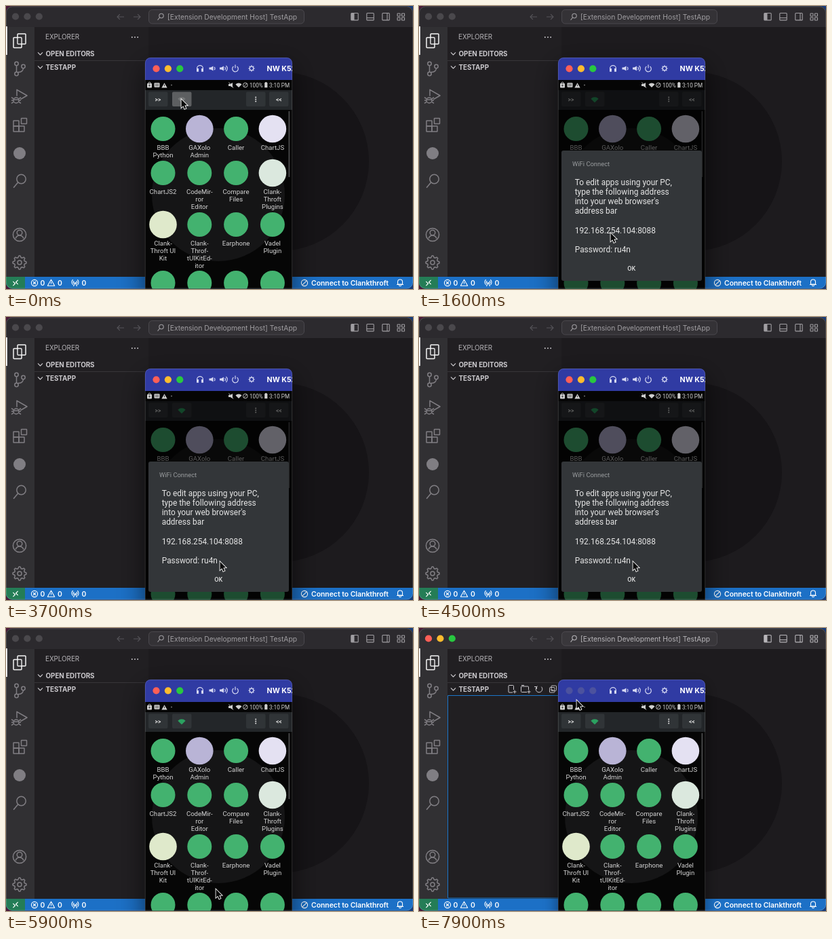
An HTML page with a canvas for the animation above (8000 ms loop, 600x417 px).

```html
<!DOCTYPE html>
<html lang="en">
<head>
<meta charset="utf-8">
<title>WiFi Connect</title>
<style>
html, body { margin: 0; width: 100%; height: 100%; overflow: hidden; background: #1c1b1e; }
canvas { display: block; width: 600px; height: 417px; }
</style>
</head>
<body>
<canvas id="stage"></canvas>
<script>
const W = 600, H = 417, LOOP = 8000, PI = Math.PI;
const canvas = document.getElementById('stage');
const dpr = window.devicePixelRatio || 1;
canvas.width = W * dpr;
canvas.height = H * dpr;
const c = canvas.getContext('2d');

const UI = 'Inter, "Open Sans", sans-serif';
const DROID = 'Roboto, "Noto Sans", sans-serif';
const LIGHTS = ['#fe5f57', '#febc2e', '#28c840'];
const ARROW = new Path2D('M.5.5v12.3l2.8-2.6 2 4.6 2.1-.9-2-4.5 3.8-.2z');

// pointer moves: start, duration, end x, end y
const moves = [
  [700, 750, 282, 334], [2900, 600, 315, 360], [4500, 600, 309, 384.5],
  [5900, 700, 159, 269], [7000, 800, 232, 106]
];
const apps = ('BBB Python,GAXolo Admin,Caller,ChartJS,ChartJS2,CodeMir- ror Editor,Compare Files,' +
  'Clank- Throft Plugins,Clank- Throft_UI Kit,Clank- Throf- tUIKitEd- itor,Earphone,Vadel Plugin,,,,').split(',');
const badges = { 1: '#b9b4d6', 3: '#e4e1f2', 7: '#dbe8de', 8: '#dfe9cb' };
const rows = [181, 246, 322, 408];
const message = ['To edit apps using your PC,', 'type the following address', "into your web browser's",
  'address bar', '', '192.168.254.104:8088', '', 'Password: ru4n'];

const clamp = v => Math.max(0, Math.min(1, v));
const ramp = (t, from, len) => clamp((t - from) / len);
const ease = v => v * v * (3 - 2 * v);

function pen(color, width = 1.1) {
  c.strokeStyle = c.fillStyle = color;
  c.lineWidth = width;
}
function rect(x, y, w, h, color) {
  c.fillStyle = color;
  c.fillRect(x, y, w, h);
}
function box(x, y, w, h, r, fill) {
  c.beginPath();
  c.roundRect(x, y, w, h, r);
  if (fill) { c.fillStyle = fill; c.fill(); } else c.stroke();
}
function dot(x, y, r, color) {
  c.beginPath();
  c.arc(x, y, r, 0, 2 * PI);
  c.fillStyle = color;
  c.fill();
}
function ring(x, y, r, mid = 0, half = PI) {
  c.beginPath();
  c.arc(x, y, r, mid - half, mid + half);
  c.stroke();
}
function line(x, y, dx, dy) {
  c.beginPath();
  c.moveTo(x, y);
  c.lineTo(x + dx, y + dy);
  c.stroke();
}
// V shape with its point facing the given angle
function chevron(x, y, s, angle) {
  c.beginPath();
  for (const k of [-1, 0, 1]) {
    const a = angle + k * PI * 0.75, r = k ? s : 0;
    c.lineTo(x + Math.cos(a) * r, y + Math.sin(a) * r);
  }
  c.stroke();
}
function triangle(x, y, r, angle, filled) {
  c.beginPath();
  for (let i = 0; i < 3; i++) {
    const a = angle + i * PI * 2 / 3;
    c.lineTo(x + Math.cos(a) * r, y + Math.sin(a) * r);
  }
  c.closePath();
  filled ? c.fill() : c.stroke();
}
function plus(x, y, s) {
  line(x - s, y, 2 * s, 0);
  line(x, y - s, 0, 2 * s);
}
function text(s, x, y, size, color, family = UI, weight = 400, align = 'left') {
  c.font = `${weight} ${size}px ${family}`;
  c.textAlign = align;
  c.fillStyle = color;
  c.fillText(s, x, y);
}
function lights(x, y, off) {
  LIGHTS.forEach((col, i) => dot(x + i * 17.4, y, 5.1, off || col));
}
function gear(x, y, r) {
  c.beginPath();
  for (let i = 0; i < 32; i++) {
    const a = (i - 0.5) * PI / 16, k = i % 4 < 2 ? r : r * 0.76;
    c.lineTo(x + Math.cos(a) * k, y + Math.sin(a) * k);
  }
  c.closePath();
  c.stroke();
  ring(x, y, r * 0.3);
}
function lens(x, y, r, side) {
  ring(x, y, r);
  line(x + side * r * 0.7, y + r * 0.7, side * r, r * 1.2);
}
function wifi(x, y, r, color) {
  c.beginPath();
  c.moveTo(x, y);
  c.arc(x, y, r, -PI * 0.75, -PI * 0.25);
  c.fillStyle = color;
  c.fill();
}
function speaker(x, y, waves) {
  triangle(x, y, 4, PI, true);
  c.fillRect(x - 4, y - 1.5, 3, 3);
  for (let i = 0; i < waves; i++) ring(x + 1.5, y, 3 + i * 2.7, 0, 0.8);
}
function banned(x, y, r) {
  ring(x, y, r);
  line(x - r * 0.7, y + r * 0.7, r * 1.4, -r * 1.4);
}

function activityBar() {
  rect(0, 31, 42, 368, '#313033');
  rect(0, 30, 1.8, 42, '#fff');
  c.lineJoin = 'round';
  pen('#f4f4f4', 1.5);
  box(17, 41, 12, 15, 1);
  box(11, 46.5, 12, 15, 1);
  rect(17.8, 47.5, 4.4, 7.7, '#313033');
  pen('#807e83', 1.5);
  // branches
  for (const y of [85, 100]) ring(15.5, y, 2.7);
  ring(25.5, 89, 2.7);
  line(15.5, 88, 0, 9);
  ring(19.5, 91.5, 6, PI * 0.3, 0.9);
  // run and debug
  triangle(21, 132, 10, 0);
  dot(15, 139, 6.5, '#313033');
  ring(15, 139, 4);
  line(11, 138, 8, 0);
  for (const k of [-4, 0, 4]) {
    line(11, 139 + k * 0.6, -3, k * 0.5);
    line(19, 139 + k * 0.6, 3, k * 0.5);
  }
  // extensions
  for (const [x, y] of [[11, 169], [11, 177], [19, 177]]) box(x, y, 8, 8, 0.5);
  box(22.5, 165.5, 8, 8, 0.5);
  dot(20, 217, 9, '#807e83');
  lens(22.5, 255, 6.7, -1);
  // account
  ring(20, 337, 9.6);
  ring(20, 334, 3.8);
  ring(20, 344, 6, -PI / 2, 1.35);
  gear(20, 378, 10);
}

function titleBar(active) {
  rect(0, 0, W, 31, active ? '#312f33' : '#2c2a2e');
  lights(14, 15.5, !active && '#4a484c');
  pen('#57555a');
  for (const [x, dir] of [[169, -1], [193, 1]]) {
    line(x - 5, 16, 10, 0);
    chevron(x + dir * 5, 16, 5.5, dir < 0 ? PI : 0);
  }
  const ink = active ? '#b8b6ba' : '#a09ea2';
  box(210.5, 5.5, 229, 20.5, 5, active ? '#39373b' : '#343236');
  pen('#525055', 0.8);
  box(210.5, 5.5, 229, 20.5, 5);
  pen(ink);
  lens(229, 14.5, 3.2, -1);
  text('[Extension Development Host] TestApp', 238, 19.5, 10.3, ink);
  // layout toggles
  for (const x of [514, 537, 560]) box(x - 5.2, 10.5, 10.4, 10.4, 1);
  c.fillRect(509, 10.5, 4.5, 10.4);
  line(532, 17.5, 10, 0);
  line(562, 10.5, 0, 10.4);
  for (const y of [11, 17]) {
    box(577, y, 4, 4, 0.5);
    box(583.5, y, 4, 4, 0.5);
  }
}

function explorer(focused) {
  const ink = '#cbc9cd';
  rect(42, 31, 168, 368, '#211f22');
  rect(42, 80, 164, 0.8, '#3d3b3f');
  text('EXPLORER', 58, 49.3, 9.8, '#b6b4b8');
  for (let i = 0; i < 3; i++) dot(185.8 + i * 4.2, 46, 0.95, ink);
  pen(ink);
  ['OPEN EDITORS', 'TESTAPP'].forEach((s, i) => {
    chevron(50.5, 72 + i * 20, 5, PI / 2);
    text(s, 58.5, 73.5 + i * 20, 9.8, ink, UI, 700);
  });
  if (!focused) return;
  pen(ink, 1);
  // new file, new folder, refresh, collapse
  box(132, 84.5, 7.5, 10.5, 1);
  box(150.5, 86, 11, 8.5, 1);
  line(151, 84.5, 4, 0);
  for (const x of [140, 161]) {
    rect(x - 2, 91, 6, 6, '#211f22');
    pen(ink, 1);
    plus(x + 1, 94, 2.5);
  }
  ring(177, 90, 4.8, PI * 0.55, 2.5);
  chevron(173.5, 86.5, 3.5, -PI / 4);
  box(195, 85, 7.5, 7.5, 1);
  box(192.5, 87.5, 7.5, 7.5, 1);
  line(194.2, 91.2, 4, 0);
  pen('#1b76c9', 1);
  c.strokeRect(42.5, 99.5, 168, 298.5);
}

function statusBar() {
  rect(0, 399, W, 18, '#1c70c6');
  rect(0, 399, 28, 18, '#247d56');
  pen('#fff');
  chevron(13.5, 409, 4.5, 0);
  chevron(14.5, 407, 4.5, PI);
  ring(42, 408, 4.6);
  for (const k of [-2, 2]) line(40, 408 - k, 4, 2 * k);
  triangle(66.5, 409.2, 6, -PI / 2);
  line(66.5, 406.5, 0, 3);
  for (const r of [2.6, 5]) for (const a of [0, PI]) ring(102, 407, r, a, 0.85);
  for (const k of [-2.5, 2.5]) line(102, 407, k, 6);
  for (const x of [50.5, 76, 111.5]) text('0', x, 411.8, 10.4, '#fff', UI, 600);
  banned(440, 408, 4.6);
  text('Connect to Clankthroft', 450, 411.8, 10.4, '#fff', UI, 600);
  // bell
  box(577.5, 403, 7, 7, [3.5, 3.5, 0, 0]);
  line(576, 410.5, 10, 0);
  ring(581, 411.2, 1.6, PI / 2, PI / 2);
}

function phoneTitle(active) {
  rect(205, 76, 217, 33, '#303ba3');
  lights(221.5, 92.3, !active && '#4c529e');
  pen('#d5d8f3', 1.2);
  ring(286, 92, 4.4, -PI / 2, PI / 2);
  for (const x of [281, 288]) c.fillRect(x, 92, 3, 4.8);
  speaker(303.5, 92, 1);
  speaker(319, 92, 2);
  ring(338, 92.5, 4.3, PI / 2, 2.5);
  line(338, 86.5, 0, 5);
  ring(362, 92, 2.8);
  for (let i = 0; i < 8; i++) {
    const dx = Math.cos(i * PI / 4), dy = Math.sin(i * PI / 4);
    line(362 + dx * 3, 92 + dy * 3, dx * 1.8, dy * 1.8);
  }
  text('NW K52', 384.5, 95.7, 10.7, '#fff', UI, 700);
}

function phoneStatus() {
  const ink = '#cfcfcf';
  rect(205, 109, 217, 15, '#050505');
  box(208, 114, 7, 6.5, 1, ink);
  box(218.5, 113.3, 8, 6.4, 1, ink);
  pen('#333', 0.8);
  plus(211.5, 117, 1.6);
  for (const y of [115.3, 117.4]) line(219.8, y, 5.4, 0);
  pen(ink, 0.9);
  ring(211.5, 114, 1.8, -PI / 2, PI / 2);
  triangle(233.5, 118, 4.8, -PI / 2, true);
  rect(233.1, 115.6, 0.8, 2.6, '#111');
  dot(244, 116.5, 0.7, ink);
  speaker(332, 116.5, 0);
  line(328.5, 112.5, 6.5, 8);
  wifi(343, 120, 6.5, ink);
  banned(352.8, 116.5, 3.3);
  rect(381.2, 113, 4.2, 7.2, ink);
  rect(382.3, 112, 2, 1.2, ink);
  text('100%', 359, 119.6, 8.2, ink, DROID);
  text('3:10 PM', 388, 119.6, 8.2, ink, DROID);
}

function phoneApps(pressed) {
  rect(205, 124, 217, 293, '#060606');
  dot(313, 278, 98, '#151516');
  rect(205, 124, 217, 29, '#232629');
  for (const x of [210, 245, 354, 388]) {
    box(x, 126.5, 28.5, 21.5, 2, x === 245 && pressed ? '#5d5f61' : '#303437');
  }
  text('>>', 224, 140.8, 8.5, '#dcdcdc', DROID, 700, 'center');
  text('<<', 402.3, 140.8, 8.5, '#dcdcdc', DROID, 700, 'center');
  wifi(259, 142.3, 8, pressed ? '#77797a' : '#2ba160');
  for (let i = 0; i < 3; i++) dot(368.2, 134.6 + i * 3, 1, '#e4e4e4');
  apps.forEach((name, i) => {
    const x = 231.5 + (i % 4) * 53.8, y = rows[i >> 2];
    dot(x, y, badges[i] ? 20.3 : 18, badges[i] || '#43b26f');
    name.split(' ').forEach((s, k) =>
      text(s.replace('_', ' '), x, y + 30.8 + k * 11, 9.6, '#d4d4d4', DROID, 400, 'center'));
  });
  rect(416.5, 155, 1.8, 97, '#4a4b4c');
}

function dialog(alpha, press) {
  c.globalAlpha = alpha;
  rect(205, 124, 217, 293, 'rgba(0,0,0,.57)');
  box(210, 213, 207, 192, 3, '#333639');
  text('WiFi Connect', 226, 236, 9.4, '#9a9d9f', DROID);
  message.forEach((s, i) => text(s, 229.7, 263.8 + i * 14.2, 11.9, '#e6e6e6', DROID));
  text('OK', 313.3, 389.5, 9, press ? '#a5a7a8' : '#e0e0e0', DROID, 500, 'center');
  c.globalAlpha = 1;
}

function phone(t, active) {
  c.save();
  c.shadowColor = `rgba(0,0,0,${active ? 0.6 : 0.45})`;
  c.shadowBlur = (active ? 38 : 22) * dpr;
  c.shadowOffsetY = (active ? 14 : 8) * dpr;
  box(205, 76, 217, 360, 8, '#060606');
  c.restore();
  c.save();
  c.beginPath();
  c.roundRect(205, 76, 217, 360, 8);
  c.clip();
  phoneApps(t < 300);
  const shown = ramp(t, 450, 180) * (1 - ramp(t, 5520, 180));
  if (shown > 0) dialog(shown, t > 5200);
  phoneStatus();
  phoneTitle(active);
  c.restore();
  pen('rgba(255,255,255,.2)', 0.8);
  box(205.3, 76.3, 216.4, 360, 8);
}

function pointer(t) {
  let x = 258, y = 137;
  for (const [start, len, toX, toY] of moves) {
    const k = ease(ramp(t, start, len));
    x += (toX - x) * k;
    y += (toY - y) * k;
  }
  c.translate(x, y);
  pen('#fff', 1.7);
  c.stroke(ARROW);
  c.fillStyle = '#0a0a0a';
  c.fill(ARROW);
}

function draw(t) {
  const editorActive = t >= 6600, focused = t >= 6800;
  c.setTransform(dpr, 0, 0, dpr, 0, 0);
  const desk = c.createLinearGradient(0, 0, W, 0);
  desk.addColorStop(0, '#4b1a38');
  desk.addColorStop(1, '#173b78');
  rect(0, 0, W, H, desk);
  c.save();
  c.beginPath();
  c.roundRect(0, 0.5, W, H - 1, 9);
  c.clip();
  rect(0, 0, W, H, '#1d1b1e');
  dot(403, 229, 132, '#161417');
  titleBar(editorActive);
  activityBar();
  explorer(focused);
  statusBar();
  phone(t, !editorActive);
  c.restore();
  pen('rgba(255,255,255,.22)', 0.8);
  box(0.4, 0.9, W - 0.8, H - 1.8, 9);
  pointer(t);
}

function tick(now) {
  draw(now % LOOP);
  requestAnimationFrame(tick);
}
draw(0);
requestAnimationFrame(tick);
</script>
</body>
</html>
```
